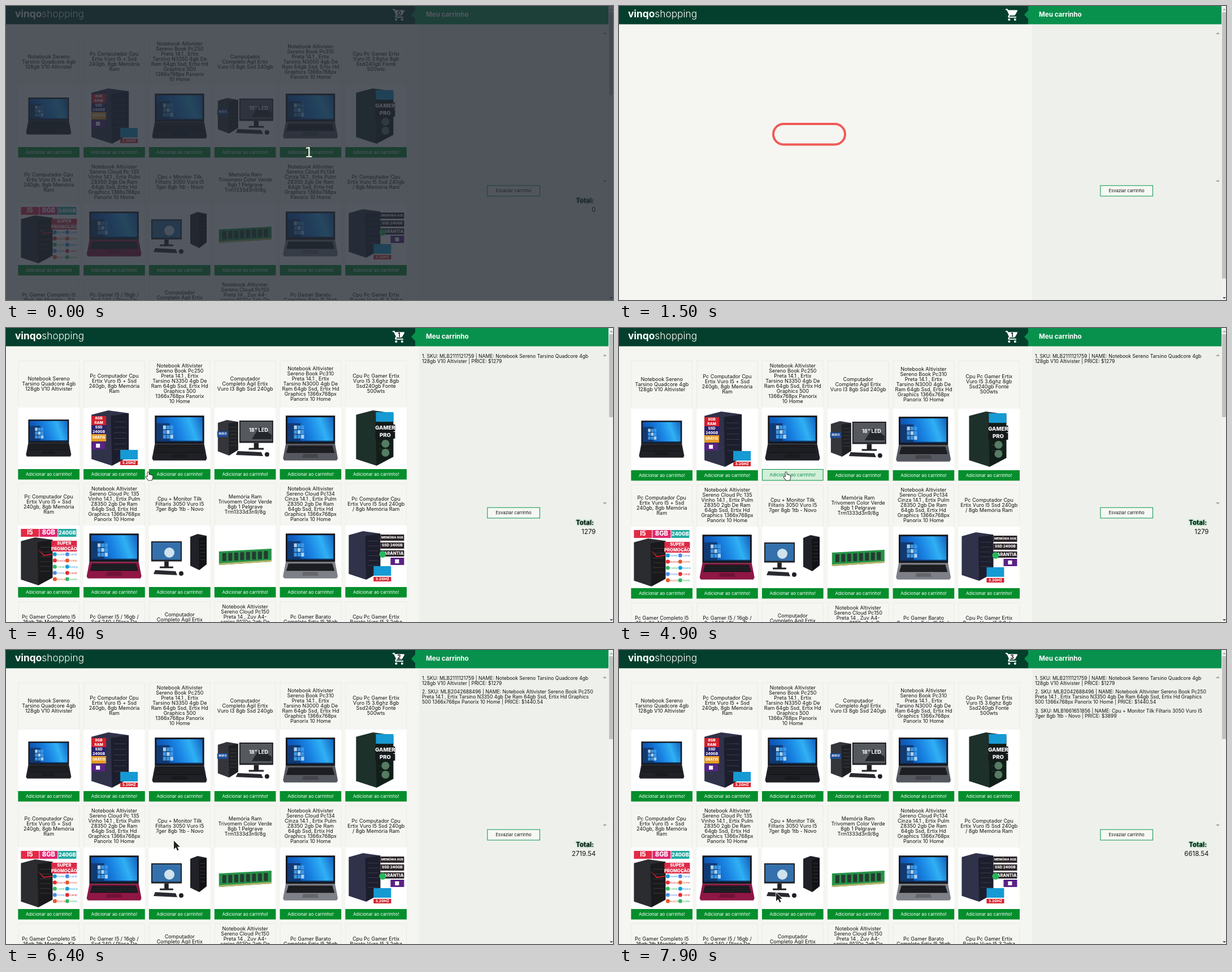
These frames come from a looping animation (1074 px wide and 521 px high, 8 s). An HTML page with a canvas:

```html
<!DOCTYPE html>
<html lang="pt-BR">
<head>
<meta charset="utf-8">
<title>Carrinho</title>
<style>
html, body { margin: 0; width: 100%; height: 100%; overflow: hidden; background: #f5f6f1; }
canvas { display: block; }
</style>
</head>
<body>
<canvas id="stage" width="1074" height="521"></canvas>
<script>
const ctx = document.getElementById('stage').getContext('2d');
const LOOP = 8000, STEP = 100, HEADER = 32.4, LINE = 9;
const INK = '#111', GREEN = '#08914d', RED = '#d51f2b', BLACK = '#202126', NAVY = '#30324a';
const CART_ICON = new Path2D('M7 18a2 2 0 1 0 0 4 2 2 0 1 0 0-4zM1 2v2h2l3.6 7.6-1.35 2.45c-.9 1.5.2 2.95 1.75 2.95h12v-2H7.4l-.2-.4.9-1.6h7.45c.75 0 1.4-.4 1.75-1l3.6-6.5A1 1 0 0 0 20 4H5.2l-.95-2zM17 18a2 2 0 1 0 0 4 2 2 0 1 0 0-4z');
const ARROW = new Path2D('M0 0V15L3.6 11.8L6.2 17.4L8.6 16.3L6 10.8H10.8Z');
const HAND = new Path2D('M-.5 1.2Q.6-.6 1.7 1.2V5Q3.2 4.3 4 5.4Q5.6 4.8 6.2 6Q8.2 5.6 8.4 7.4V10.5L6.8 14.8H1L-3.4 9.4Q-3.6 7.6-2 8L-.5 9.4Z');

const titles = [
  'Notebook Sereno|Tarsino Quadcore 4gb|128gb V10 Altivister',
  'Pc Computador Cpu|Ertix Vuro I5 + Ssd|240gb, 8gb Memória|Ram',
  'Notebook Altivister|Sereno Book Pc250|Preta 14.1 , Ertix|Tarsino N3350 4gb De|Ram 64gb Ssd, Ertix Hd|Graphics 500|1366x768px Panorix|10 Home',
  'Computador|Completo Ágil Ertix|Vuro I3 8gb Ssd 240gb',
  'Notebook Altivister|Sereno Book Pc310|Preta 14.1 , Ertix|Tarsino N3000 4gb De|Ram 64gb Ssd, Ertix Hd|Graphics 1366x768px|Panorix 10 Home',
  'Cpu Pc Gamer Ertix|Vuro I5 3.6ghz 8gb|Ssd240gb Fonte|500wts',
  'Pc Computador Cpu|Ertix Vuro I5 + Ssd|240gb, 8gb Memória|Ram',
  'Notebook Altivister|Sereno Cloud Pc 135|Vinho 14.1 , Ertix Pulm|Z8350 2gb De Ram|64gb Ssd, Ertix Hd|Graphics 1366x768px|Panorix 10 Home',
  'Cpu + Monitor Tilk|Filtaris 3050 Vuro I5|7ger 8gb 1tb - Novo',
  'Memória Ram|Trivomem Color Verde|8gb 1 Pelgrave|Trm1333d3n9/8g',
  'Notebook Altivister|Sereno Cloud Pc134|Cinza 14.1 , Ertix Pulm|Z8350 2gb De Ram|64gb Ssd, Ertix Hd|Graphics 1366x768px|Panorix 10 Home',
  'Pc Computador Cpu|Ertix Vuro I5 Ssd 240gb|/ 8gb Memória Ram',
  'Pc Gamer Completo I5|16gb 1tb Monitor - Kit|Teclado|Mouse',
  'Pc Gamer I5 / 16gb /|Ssd 240 / Placa De|Vídeo|4gb',
  'Computador|Completo Ágil Ertix|Vuro I5|8gb|Ssd',
  'Notebook Altivister|Sereno Cloud Pc150|Preta 14 , Zuv A4-|series 9120c 2gb De|Ram|64gb|Ssd|Tela',
  'Pc Gamer Barato|Completo Ertix I5 16gb|Ssd|240gb',
  'Cpu Pc Gamer Ertix|Barato Vuro I5 3.2ghz|8gb|Ssd'
].map(s => s.split('|'));

// Each row is as tall as its longest title.
let nextTop = 57.5;
const rows = [0, 1, 2].map(r => {
  const top = nextTop;
  const longest = Math.max(...titles.slice(r * 6, r * 6 + 6).map(l => l.length));
  const image = top + longest * LINE + 11.5, button = image + 109, end = button + 18.5;
  nextTop = end + 7;
  return { top, image, button, end, longest };
});

const purchases = [
  { card: 0, enter: 2700, add: 3800, leave: 4200, price: 1279,
    text: '1. SKU: MLB2111121759 | NAME: Notebook Sereno Tarsino Quadcore 4gb\n128gb V10 Altivister | PRICE: $1279' },
  { card: 2, enter: 4500, add: 5800, leave: 6300, price: 1440.54,
    text: '2. SKU: MLB2042688496 | NAME: Notebook Altivister Sereno Book Pc250\nPreta 14.1 , Ertix Tarsino N3350 4gb De Ram 64gb Ssd, Ertix Hd Graphics\n500 1366x768px Panorix 10 Home | PRICE: $1440.54' },
  { card: 8, enter: 7200, add: 7500, leave: 7700, price: 3899,
    text: '3. SKU: MLB1661651856 | NAME: Cpu + Monitor Tilk Filtaris 3050 Vuro I5\n7ger 8gb 1tb - Novo | PRICE: $3899' }
];
const moves = [
  { from: 2300, to: 2800, x: 89, y: 253 },
  { from: 4100, to: 4850, x: 295, y: 255 },
  { from: 6250, to: 7200, x: 300, y: 462 },
  { from: 7550, to: 7900, x: 278, y: 430 }
];

const clamp = v => Math.min(1, Math.max(0, v));
const easeOut = p => 1 - (1 - p) ** 3;
const mix = (a, b, p) => `rgb(${a.map((v, i) => Math.round(v + (b[i] - v) * p))})`;

function rect(color, x, y, w, h) { ctx.fillStyle = color; ctx.fillRect(x, y, w, h); }
function frame(color, x, y, w, h) {
  ctx.strokeStyle = color;
  ctx.lineWidth = 1;
  ctx.strokeRect(x + .5, y + .5, w - 1, h - 1);
}
function poly(color, ...p) {
  ctx.beginPath();
  for (let i = 0; i < p.length; i += 2) ctx.lineTo(p[i], p[i + 1]);
  ctx.fillStyle = color;
  ctx.fill();
}
function disc(color, x, y, r) {
  ctx.beginPath();
  ctx.arc(x, y, r, 0, 7);
  ctx.fillStyle = color;
  ctx.fill();
}
function text(s, x, y, size, { color = INK, align = 'center', weight = 400, family = 'Inter' } = {}) {
  ctx.font = `${weight} ${size}px ${family}, sans-serif`;
  ctx.textAlign = align;
  ctx.textBaseline = 'middle';
  ctx.fillStyle = color;
  ctx.fillText(s, x, y);
}
function at(x, y, scale, draw) {
  ctx.save();
  ctx.translate(x, y);
  ctx.scale(scale, scale);
  draw();
  ctx.restore();
}

// Product pictures, drawn in a box 108 units wide.
function stack(labels, color, x, y, w, h, gap = 0) {
  labels.forEach((s, i) => {
    const top = y + i * (h + gap);
    rect(color, x, top, w, h);
    text(s, x + w / 2, top + h / 2, Math.min(h * .8, w / s.length * 1.4), { color: '#fff', weight: 800 });
  });
}
function laptop(w, body) {
  at(54 - w / 2, 54 - w * .41, w, () => {
    rect('#15161b', .05, 0, .9, .52);
    const g = ctx.createLinearGradient(.08, .4, .92, .1);
    ['#1048a0', '#0f62c4', '#1a86e4', '#30b0f4', '#1568c4'].forEach((c, i) => g.addColorStop(i / 4, c));
    rect(g, .08, .03, .84, .45);
    rect('#123a72', .08, .14, .24, .32);
    for (let i = 0; i < 9; i++)
      rect(i % 4 ? '#3d97e2' : '#a9d2f2', .2 + i % 3 * .065, .18 + (i / 3 | 0) * .085, .055, .07);
    rect('#0b2b58', .08, .46, .84, .02);
    poly(body, .05, .52, .95, .52, 1, .78, .98, .82, .02, .82, 0, .78);
    poly('#141519', .1, .55, .9, .55, .94, .68, .06, .68);
    for (let i = 0; i < 4; i++) rect('#3c3d43', .1 - i * .008, .57 + i * .027, .8 + i * .016, .006);
    poly('#0003', .37, .7, .63, .7, .65, .77, .35, .77);
  });
}
function tower(x, y, w, h, side = NAVY) {
  at(x, y, 1, () => {
    poly(side, 0, h * .08, w * .45, 0, w, h * .05, w, h * .84, w * .55, h, 0, h * .88);
    poly('#0006', w * .52, h * .1, w, h * .05, w, h * .84, w * .55, h);
    for (let i = 2; i < 8; i++) rect('#fff2', w * .6, h * i / 10, w * .33, 1);
  });
}
function screen(x, y, w, fill) {
  const h = w * .66;
  rect(BLACK, x, y, w, h);
  rect(fill, x + 2, y + 2, w - 4, h - 5);
  rect(BLACK, x + w * .43, y + h, w * .14, 10);
  rect(BLACK, x + w * .28, y + h + 9, w * .44, 3);
}
function keyboard(x, y, w) {
  poly('#292a2f', x + 3, y, x + w - 3, y + 2, x + w, y + 9, x, y + 7);
  disc(BLACK, x + w + 7, y + 6, 4);
}
function badge(x, y) {
  rect('#169ad4', x, y, 31, 17);
  stack(['3.2GHZ'], RED, x, y + 19, 31, 8);
}
function label(x, y) {
  rect('#5a2386', x, y, 24, 13);
  rect('#fff', x + 8, y + 3, 7, 7);
}
const pictures = [
  () => laptop(80, BLACK),
  () => {
    tower(14, 5, 66, 98);
    stack(['8GB', 'RAM'], RED, 14, 15, 26, 8);
    stack(['SSD', '240GB'], '#2b236b', 14, 31, 26, 8);
    stack(['GRÁTIS'], '#e79b25', 14, 47, 26, 13);
    label(14, 61);
    badge(65, 75);
  },
  () => laptop(97, BLACK),
  () => {
    tower(6, 22, 36, 63, '#34363c');
    stack(['8GB I3'], '#214e98', 5, 42, 19, 10);
    screen(44, 23, 60, '#55595e');
    poly('#23262b', 66, 56, 80, 34, 101, 48, 101, 56);
    text('18” LED', 78, 40, 9, { color: '#fff', weight: 700 });
    keyboard(38, 77, 48);
  },
  () => laptop(97, '#55585e'),
  () => {
    tower(19, 5, 66, 98, '#1d302a');
    rect('#169ad4', 54, 8, 31, 17);
    stack(['GAMER', 'PRO'], '#15191b', 53, 30, 35, 12, 1);
    for (const y of [64, 80]) disc('#567c63', 71, y, 7);
  },
  () => {
    ['#e32b45', '#df2871', '#25aaa2'].forEach((c, i) => stack([['I5', '8GB', '240GB'][i]], c, 5 + i * 33, 6, 32, 14));
    tower(5, 21, 56, 85, '#2b2c30');
    poly(RED, 34, 41, 46, 52, 60, 50, 60, 52, 45, 54);
    stack(['SUPER', 'PROMOÇÃO'], '#dc2945', 59, 27, 45, 9.5);
    // Small coloured marks with unreadable names beside them.
    const colors = ['#189bd8', '#e52c31', '#34b864', '#4e8be8', '#e6572c'];
    for (let i = 0; i < 10; i++) {
      const x = 65 + i % 2 * 22, y = 51 + (i / 2 | 0) * 11, color = colors[i * 3 % 5];
      disc(color, x, y, 3.5);
      text(['nome', 'canal', 'busca'][i % 3], x + 11, y, 5, { color });
    }
  },
  () => laptop(97, '#8e1745'),
  () => {
    screen(4, 28, 54, '#3470ab');
    disc('#cfe2ee', 36, 48, 9);
    keyboard(8, 79, 42);
    tower(73, 15, 29, 64, BLACK);
  },
  () => {
    poly('#269348', 8, 46, 101, 41, 101, 64, 8, 70);
    poly('#b9b56b', 8, 67, 101, 61, 101, 64, 8, 70);
    for (let i = 0; i < 8; i++) rect('#253b31', 14 + i * 10.5, 49 - i * .55, 7, 14);
  },
  () => laptop(97, '#7d8087'),
  () => {
    tower(6, 10, 56, 86);
    stack(['MEMÓRIA 8GB', 'SSD 240GB', 'GARANTIA'], '#2c2529', 62, 16, 42, 11, 3);
    disc('#28b65c', 66, 51, 6);
    label(80, 57);
    badge(50, 72);
  }
];

function drawCard(i, hover) {
  const r = rows[i / 6 | 0], x = 21.4 + i % 6 * 115.8, w = 108.6, mid = x + w / 2;
  const lines = titles[i], active = hover?.card === i;
  // The hover border adds two pixels; the row grows only under its tallest card.
  const grows = hover && titles[hover.card].length === rows[hover.card / 6 | 0].longest;
  const extra = grows ? 2 : 0, border = active ? 2 : 0;
  const sameRow = !hover || rows[hover.card / 6 | 0] === r;
  const stretch = sameRow ? extra : 0, shift = stretch - border;
  at(0, extra - stretch, 1, () => {
    frame('#e9ebe5', x, r.top, w, r.end + stretch - r.top);
    const y = (r.top + r.image + shift - (lines.length - 1) * LINE) / 2;
    lines.forEach((s, n) => text(s, mid, y + n * LINE, 9));
    ctx.translate(0, shift);
    rect('#fff', x, r.image, w, r.button - r.image);
    at(x, r.image, 1, () => pictures[i]?.());
    const p = active ? hover.p : 0, h = r.end - r.button + border;
    rect(mix([5, 142, 44], [212, 239, 217], p), x, r.button, w, h);
    if (active) frame(GREEN, x, r.button, w, h);
    text('Adicionar ao carrinho!', mid, r.button + h / 2, 7.8, { color: mix([255, 255, 255], [10, 145, 77], p) });
  });
}

function drawCart(t, loading) {
  const items = purchases.filter(p => t >= p.add);
  let y = 50;
  for (const item of items) {
    for (const line of item.text.split('\n')) {
      text(line, 736, y, 8.6, { align: 'left' });
      y += LINE;
    }
    y += 6.5;
  }
  poly('#a3a5a2', 1056, 50, 1059.5, 46.5, 1063, 50);
  poly('#a3a5a2', 1056, 309, 1059.5, 312.5, 1063, 309);
  rect('#f7f8f4', 851.3, 317.7, 93.7, 19.7);
  frame(GREEN, 851.3, 317.7, 93.7, 19.7);
  text('Esvaziar carrinho', 898, 327.7, 7.7);
  if (loading) return;
  ctx.shadowColor = '#08a04f';
  ctx.shadowBlur = 3;
  text('Total:', 1040, 346, 11.5, { align: 'right', weight: 700 });
  ctx.shadowBlur = 0;
  const total = items.reduce((sum, p) => sum + p.price, 0);
  text(+total.toFixed(2), 1043.5, 361.5, 11.5, { align: 'right' });
  return items.length;
}

function drawHeader(count) {
  const color = '#fff', align = 'left';
  rect('#033f2c', 0, 0, 724, HEADER);
  rect(GREEN, 724, 0, 342, HEADER);
  poly(GREEN, 724, 8, 717, 15.5, 724, 23);
  text('vinqo', 16, 15, 17.3, { color, align, weight: 700 });
  text('shopping', 16 + ctx.measureText('vinqo').width, 15, 17.3, { color, align, weight: 300 });
  text('Meu carrinho', 743, 15.5, 11.6, { color, align, weight: 700 });
  at(683, 3, 1.05, () => { ctx.fillStyle = color; ctx.fill(CART_ICON); });
  if (count !== undefined) text(count, 695.5, 12.5, 10, { weight: 700 });
}

function drawScrollbar(end) {
  rect('#f1f1f1', 1066, 0, 8, 521);
  rect('#c1c1c1', 1067, 11, 7, end - 11);
  poly('#a3a3a3', 1068, 7.5, 1071, 4.5, 1074, 7.5);
  poly('#505050', 1068, 516, 1071, 519, 1074, 516);
}

function drawPointer(t, hover) {
  let x = 205, y = 32;
  for (const m of moves) {
    const p = easeOut(clamp((t - m.from) / (m.to - m.from)));
    x += (m.x - x) * p;
    y += (m.y - y) * p;
  }
  const hand = hover || y > 238 && y < 269;
  at(Math.round(x), Math.round(y), 1, () => {
    const shape = hand ? HAND : ARROW;
    ctx.lineJoin = 'round';
    ctx.lineWidth = 1.6;
    ctx.strokeStyle = hand ? INK : '#fff';
    ctx.fillStyle = hand ? '#fff' : '#222';
    ctx.stroke(shape);
    ctx.fill(shape);
  });
}

function drawFrame(t) {
  const loading = t >= 1500 && t < 1600;
  const target = purchases.find(p => t >= p.enter && t < p.leave);
  const hover = target && { card: target.card, p: clamp((t - target.enter) / 350) };
  rect('#f5f6f1', 0, 0, 1074, 521);
  rect('#eef1eb', 731, 0, 335, 521);
  if (loading) {
    ctx.beginPath();
    ctx.roundRect(273, 209, 127, 36.5, 18.25);
    ctx.strokeStyle = '#ef5a57';
    ctx.lineWidth = 4;
    ctx.stroke();
  } else {
    titles.forEach((_, i) => drawCard(i, hover));
  }
  drawHeader(drawCart(t, loading));
  drawScrollbar(loading ? 483 : t >= 1600 && t < 2000 ? 191 : 158);
  if (t >= moves[0].from) drawPointer(t, hover);
  if (t < STEP) {
    rect('rgba(35,41,52,.78)', 0, 0, 1074, 521);
    text('1', 536, 262, 24, { color: '#f5f5dc', family: '"DejaVu Sans"' });
  }
}

const start = performance.now();
function tick(now) {
  drawFrame(Math.floor(Math.max(0, now - start) % LOOP / STEP) * STEP);
  requestAnimationFrame(tick);
}
tick(start);
</script>
</body>
</html>
```
